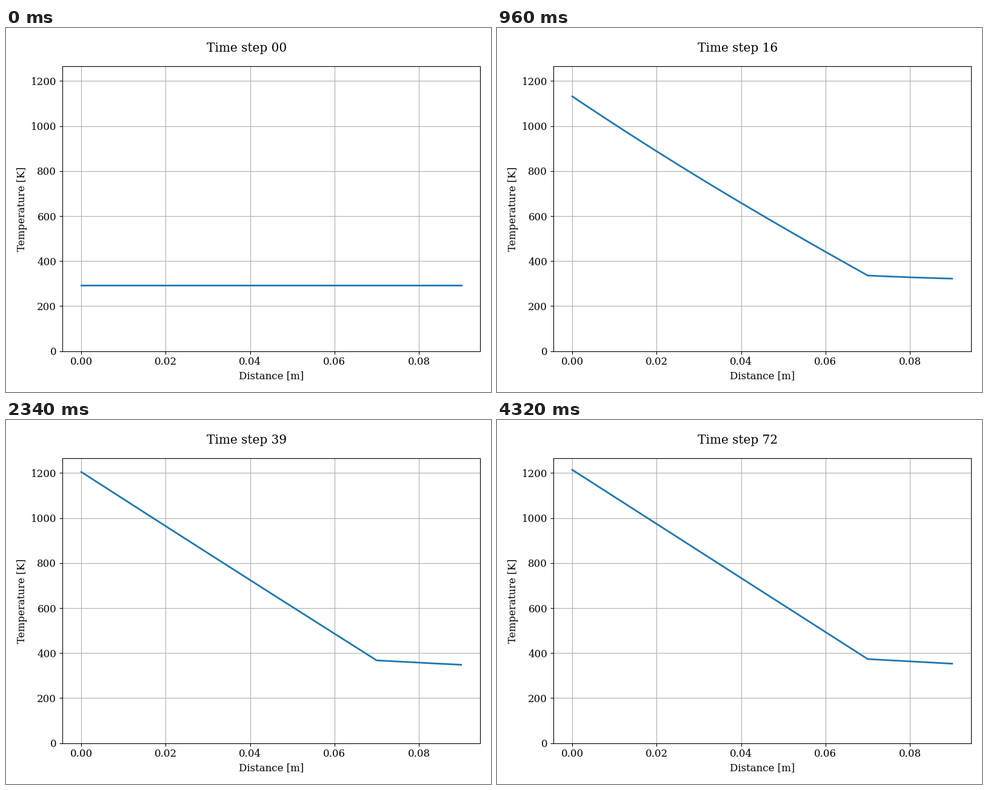
These frames come from a looping animation (800 by 600 pixels, 4.38 s). A matplotlib script:

```python
import numpy as np
import matplotlib.pyplot as plt
from matplotlib.animation import FuncAnimation

plt.rcParams.update({
    "font.family": "DejaVu Serif",
    "font.size": 12,
    "axes.linewidth": 0.8,
})

STEPS = 73
INTERVAL = 60

# Two-layer wall, conductivities relative to the inner layer
DX = 0.001
WALL, KINK = 0.09, 0.07
K_IN, K_OUT = 1.0, 11.715
C_IN, C_OUT = 4010.0, 93450.0      # heat capacity, per time step
H_IN, H_OUT = 6.714, 198.5         # convection on both faces
T_GAS, T_AIR = 3003.0, 293.0

x = np.linspace(0, WALL, round(WALL / DX) + 1)
inner = (x[:-1] + DX / 2) < KINK
cond = np.where(inner, K_IN, K_OUT) / DX
half = np.where(inner, C_IN, C_OUT) * DX / 2

# Nodal capacities and conductance matrix
cap = np.zeros(x.size)
cap[:-1] += half
cap[1:] += half

diag = np.zeros(x.size)
diag[:-1] += cond
diag[1:] += cond
diag[0] += H_IN
diag[-1] += H_OUT
K = np.diag(diag) - np.diag(cond, 1) - np.diag(cond, -1)

load = np.zeros(x.size)
load[0] = H_IN * T_GAS
load[-1] = H_OUT * T_AIR

# Exact transient as a sum of decaying modes
steady = np.linalg.solve(K, load)
root = np.sqrt(cap)
rate, modes = np.linalg.eigh(K / np.outer(root, root))
weight = modes.T @ (root * (T_AIR - steady))


def temperature(step):
    return steady + modes @ (weight * np.exp(-rate * step)) / root


fig = plt.figure(figsize=(8, 6), dpi=100, facecolor="white")
left, right, top, bottom = 92.9, 782.0, 63.2, 532.7
ax = fig.add_axes([left / 800, 1 - bottom / 600,
                   (right - left) / 800, (bottom - top) / 600])
ax.set_xlim(-0.05 * WALL, 1.05 * WALL)
ax.set_ylim(0, 1265.1)
ax.set_xticks(np.arange(0, 0.09, 0.02))
ax.set_yticks(range(0, 1201, 200))
ax.set_xlabel("Distance [m]")
ax.set_ylabel("Temperature [K]")
ax.grid(True)

line, = ax.plot(x, temperature(0), color="#1f77b4", linewidth=2)
title = fig.text(331 / 800, 561 / 600, "", fontsize=14.4,
                 ha="left", va="baseline")


def update(step):
    line.set_ydata(np.full(x.size, T_AIR) if step == 0 else temperature(step))
    title.set_text(f"Time step {step:02d}")
    return line, title


anim = FuncAnimation(fig, update, frames=STEPS, interval=INTERVAL,
                     repeat=True, repeat_delay=0, blit=False)
plt.show()
```
